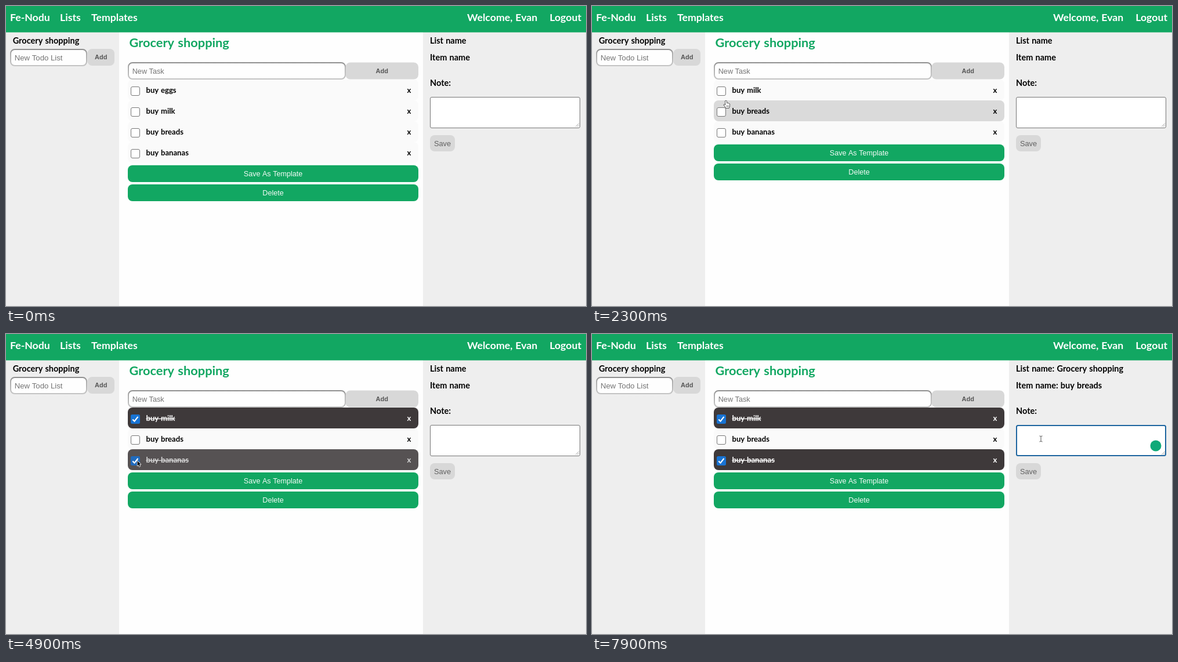
An HTML page with a canvas that plays this animation: 1000x518 px, repeating every 8 s.

```html
<!DOCTYPE html>
<html lang="en">
<head>
<meta charset="utf-8">
<title>Todo list</title>
<style>
  html, body { margin: 0; width: 100%; height: 100%; overflow: hidden; background: #fefefe; }
  canvas { display: block; }
</style>
</head>
<body>
<canvas id="stage" width="1000" height="518"></canvas>
<script>
const ctx = document.getElementById('stage').getContext('2d');
const LOOP = 8000, ROW_TOP = 127, ROW_H = 36;
const GREEN = '#12a762', GREY = '#d8d8d8';
const HUMAN = 'Lato, Carlito, sans-serif', UI = '"Liberation Sans", Arial, sans-serif';

const REMOVED_AT = 1500, SELECTED_AT = 5900, FOCUS_AT = 7650, BADGE_AT = 7800;
const checkedAt = { 'buy milk': 2920, 'buy bananas': 4600 };

// Pointer path: time, x, y of the hot spot
const path = [
  [200, 480, 114], [600, 570, 117], [900, 688, 143], [1000, 692, 148], [1200, 698, 154],
  [1550, 698, 154], [1950, 420, 173], [2300, 231, 164], [2550, 225, 148],
  [3300, 225, 148], [3800, 222, 220], [3900, 222, 221], [4850, 222, 221],
  [5200, 300, 188], [5400, 318, 184], [5550, 327, 185], [5700, 329, 186],
  [5900, 329, 186], [6000, 331, 187], [6300, 331, 187], [7000, 752, 176], [7200, 774, 181]
];

const clamp = v => Math.min(1, Math.max(0, v));
const smooth = v => { v = clamp(v); return v * v * (3 - 2 * v); };
const lerp = (a, b, p) => a + (b - a) * p;
const channels = hex => [1, 3, 5].map(i => parseInt(hex.slice(i, i + 2), 16));
function mix(a, b, p) {
  const to = channels(b);
  return `rgb(${channels(a).map((v, i) => Math.round(lerp(v, to[i], p))).join()})`;
}

function pointer(t) {
  if (t < path[0][0]) return null;
  const i = path.findIndex(k => k[0] > t);
  if (i < 0) return { x: 774, y: 181 };
  const [t0, x0, y0] = path[i - 1], [t1, x1, y1] = path[i];
  const p = smooth((t - t0) / (t1 - t0));
  return { x: lerp(x0, x1, p), y: lerp(y0, y1, p) };
}

const tasksAt = t => (t < REMOVED_AT ? ['buy eggs'] : []).concat('buy milk', 'buy breads', 'buy bananas');
const inside = (p, x, y, w, h) => p.x >= x && p.x < x + w && p.y >= y && p.y < y + h;

function hovered(t, task, onDelete) {
  const p = pointer(t), i = tasksAt(t).indexOf(task);
  if (!p || i < 0) return false;
  const x = onDelete ? 679 : 210;
  return inside(p, x, ROW_TOP + i * ROW_H, 711 - x, ROW_H);
}

// Averaging the recent past gives a short fade in and out
function hoverAmount(t, task, onDelete) {
  let hits = 0;
  for (let k = 0; k < 10; k++) hits += hovered(t - k * 16, task, onDelete);
  return hits / 10;
}

function box(x, y, w, h, r, fill, stroke, line = 1) {
  ctx.beginPath();
  ctx.roundRect(x, y, w, h, r);
  if (fill) { ctx.fillStyle = fill; ctx.fill(); }
  if (stroke) { ctx.strokeStyle = stroke; ctx.lineWidth = line; ctx.stroke(); }
}

function text(str, x, y, size, color = '#000', { font = HUMAN, weight = 700, align = 'left' } = {}) {
  ctx.font = `${weight} ${size}px ${font}`;
  ctx.wordSpacing = font === HUMAN ? `${size * 0.045}px` : '0px';
  ctx.textAlign = align;
  ctx.fillStyle = color;
  ctx.fillText(str, x, y);
}

function button(label, x, y, w, h, fill, color, size, weight) {
  box(x, y, w, h, 8, fill);
  text(label, x + w / 2, y + h / 2 + size * 0.36, size, color, { font: UI, weight, align: 'center' });
}

function input(label, x, y, w, h, size) {
  const edge = ctx.createLinearGradient(0, y, 0, y + h);
  edge.addColorStop(0, '#8c8c8c');
  edge.addColorStop(0.3, '#acacac');
  edge.addColorStop(1, '#c4c4c4');
  box(x + 1, y + 1, w - 2, h - 2, 7, '#fefefe', edge, 2);
  text(label, x + 7.7, y + h / 2 + 4.5, size, '#757575', { font: UI, weight: 400 });
}

function checkbox(x, y, checked, progress) {
  if (!checked) return box(x + .5, y + .5, 15, 15, 2.5, '#fff', '#767676');
  box(x, y, 16, 16, 2.5, mix('#4a4148', '#1873d3', progress));
  ctx.beginPath();
  ctx.moveTo(x + 3.3, y + 8.5);
  ctx.lineTo(x + 6.5, y + 11.7);
  ctx.lineTo(x + 12.5, y + 3.8);
  ctx.strokeStyle = '#fff';
  ctx.lineWidth = 2.2;
  ctx.stroke();
}

function row(t, task, i) {
  const y = ROW_TOP + i * ROW_H, start = checkedAt[task];
  const checked = start !== undefined && t >= start;
  const done = checked ? smooth((t - start) / 400) : 0;
  const hover = hoverAmount(t, task), del = hoverAmount(t, task, true);
  const base = lerp(250, 218, hover);
  const hex = '#' + Math.round(base).toString(16).repeat(3);
  box(210, y, 501, ROW_H, 8, mix(hex, '#3e393a', done));
  if (del > 0) {
    ctx.globalAlpha = del;
    box(679, y, 32, ROW_H, 8, '#ea4335');
    ctx.globalAlpha = 1;
  }
  checkbox(215, y + 12, checked, done);
  const ink = mix('#000000', '#ffffff', done);
  text(task, 241.5, y + 23.3, 13.1, ink);
  if (checked) ctx.fillRect(241.5, y + 18.8, ctx.measureText(task).width, 1.2);
  text('x', 695, y + 23.3, 13.1, mix('#000000', '#ffffff', Math.max(done, del)), { align: 'center' });
}

function polygon(points, fill, stroke, line) {
  ctx.beginPath();
  points.forEach(([x, y]) => ctx.lineTo(x, y));
  ctx.closePath();
  ctx.lineJoin = 'round';
  ctx.strokeStyle = stroke;
  ctx.lineWidth = line;
  ctx.stroke();
  ctx.fillStyle = fill;
  ctx.fill();
}

function arrow() {
  polygon([[0, 0], [0, 8.5], [2, 6.8], [3.4, 10], [4.9, 9.3], [3.5, 6.2], [6, 6]], '#111', '#fff', 1.4);
}

function hand() {
  polygon([[-1, 0], [.8, 0], [1.4, 4], [3.2, 3.8], [5, 4.6], [6.4, 5.6], [6.2, 9], [5, 12], [0, 12],
    [-1.6, 9.4], [-3.6, 6.6], [-2.4, 6], [-.6, 7.2]], '#fff', '#333', 1.5);
  ctx.fillStyle = '#555';
  for (const x of [.8, 2.4, 4]) ctx.fillRect(x, 7.5, .7, 3);
}

function beam() {
  ctx.strokeStyle = '#555';
  ctx.lineWidth = 1;
  ctx.beginPath();
  ctx.moveTo(-2.5, -5);
  ctx.quadraticCurveTo(0, -5, 0, -3.5);
  ctx.quadraticCurveTo(0, -5, 2.5, -5);
  ctx.moveTo(0, -3.5);
  ctx.lineTo(0, 3.5);
  ctx.moveTo(-2.5, 5);
  ctx.quadraticCurveTo(0, 5, 0, 3.5);
  ctx.quadraticCurveTo(0, 5, 2.5, 5);
  ctx.stroke();
}

function drawPointer(t) {
  const p = pointer(t);
  if (!p) return;
  const rows = tasksAt(t).length;
  const inRows = inside(p, 210, ROW_TOP, 501, rows * ROW_H);
  const onCheck = inRows && inside(p, 215, ROW_TOP, 16, rows * ROW_H) && (p.y - ROW_TOP) % ROW_H >= 12;
  const inField = inside(p, 210, 97, 375, 30) || inside(p, 731, 157, 259, 54);
  ctx.save();
  ctx.translate(p.x, p.y);
  if (inField) beam();
  else if (inRows && !onCheck) hand();
  else arrow();
  ctx.restore();
}

function header() {
  ctx.fillStyle = GREEN;
  ctx.fillRect(0, 0, 1000, 45.5);
  const size = 17.7, y = 26;
  text('Fe-Nodu', 7, y, size, '#fff');
  text('Lists', 93, y, size, '#fff');
  text('Templates', 147, y, size, '#fff');
  text('Welcome, Evan', 795, y, size, '#fff');
  text('Logout', 992, y, size, '#fff', { align: 'right' });
}

function notePanel(t) {
  const selected = t >= SELECTED_AT, focused = t >= FOCUS_AT;
  text('List name' + (selected ? ': Grocery shopping' : ''), 731, 65, 14.5);
  text('Item name' + (selected ? ': buy breads' : ''), 731, 93.6, 14.5);
  text('Note:', 731, 137.6, 14.5);
  if (focused) box(732, 158, 257, 52, 2.5, '#fff', '#1d659f', 2);
  else box(731.5, 157.5, 258, 53, 2.5, '#fff', '#767676');
  ctx.beginPath();
  for (const d of [3, 6]) {
    ctx.moveTo(988 - d, 208.5);
    ctx.lineTo(988, 208.5 - d);
  }
  ctx.strokeStyle = '#888';
  ctx.lineWidth = .8;
  ctx.stroke();
  if (t >= BADGE_AT) box(962.5, 183.5, 19, 19, 9.5, '#10a978');
  button('Save', 731, 223, 43, 28, GREY, '#606060', 12.8, 400);
}

function draw(t) {
  ctx.fillStyle = '#fefefe';
  ctx.fillRect(0, 0, 1000, 518);
  ctx.fillStyle = '#eeeeee';
  ctx.fillRect(0, 45, 195, 473);
  ctx.fillRect(719, 45, 281, 473);
  header();

  text('Grocery shopping', 11.7, 65, 14.5);
  input('New Todo List', 7, 74, 133, 30, 13.2);
  button('Add', 140.5, 74, 46.5, 29, GREY, '#555', 11, 700);

  text('Grocery shopping', 212.5, 71.3, 21.8, GREEN);
  input('New Task', 210, 97, 376, 30, 12.7);
  button('Add', 585.5, 97.5, 125.5, 29, GREY, '#555', 11, 700);

  const tasks = tasksAt(t), bottom = ROW_TOP + tasks.length * ROW_H;
  tasks.forEach((task, i) => row(t, task, i));
  button('Save As Template', 210, bottom + 4, 501, 29, GREEN, '#f4fbf7', 12.6, 400);
  button('Delete', 210, bottom + 37, 501, 29, GREEN, '#f4fbf7', 12.6, 400);

  notePanel(t);
  drawPointer(t);
}

const begin = performance.now();
function tick() {
  draw((performance.now() - begin) % LOOP);
  requestAnimationFrame(tick);
}
tick();
</script>
</body>
</html>
```
